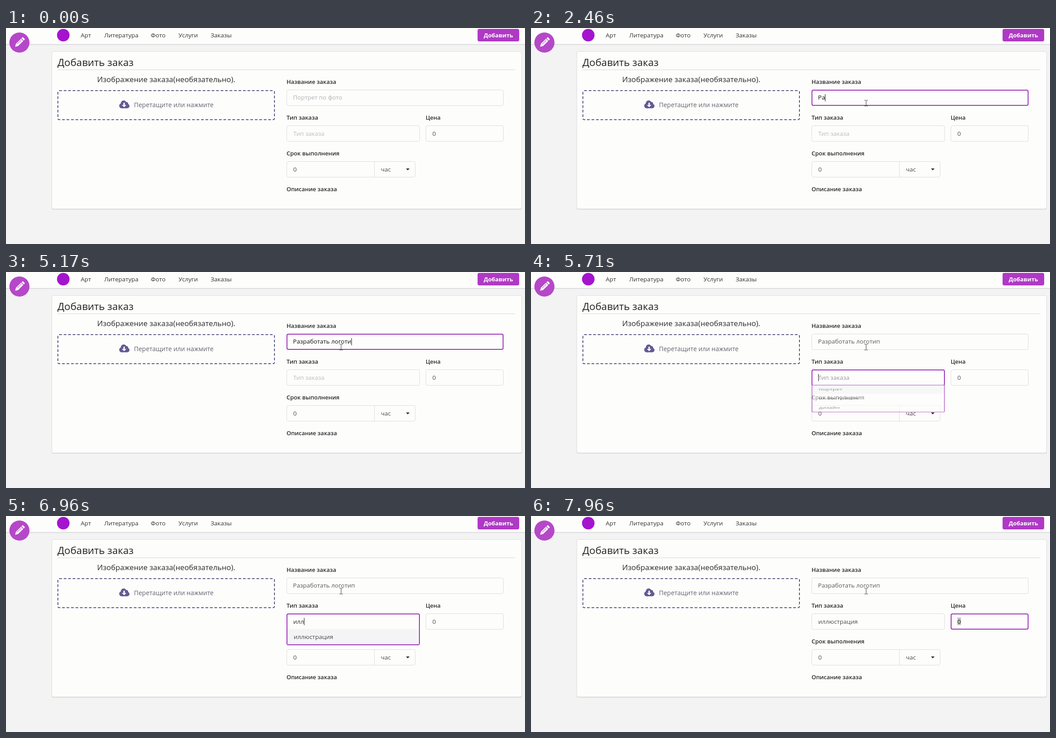
These frames come from a looping animation (1160x483 px, 8000 ms). An HTML page:

```html
<!DOCTYPE html>
<html lang="ru">
<head>
<meta charset="utf-8">
<title>Добавить заказ</title>
<style>
  html, body { margin: 0; width: 100%; height: 100%; overflow: hidden; background: #f3f3f4; }
  svg { display: block; width: 1160px; height: 483px; }
  text { font-family: "Open Sans", "Noto Sans", sans-serif; font-size: 13.5px; fill: #4a4a4c; white-space: pre; }
  .nav { fill: #333; }
  .label { font-size: 13px; font-weight: 600; fill: #2a2a2c; }
  .field { fill: #fdfdfc; stroke: #dcdce0; }
  .focus { fill: none; stroke: #9c33b6; stroke-width: 2; }
  .caret { fill: #111; }
  .drop {
    position: absolute; left: 115px; top: 139px; width: 486px; height: 67px;
    box-sizing: border-box; border: 2px dashed #5f5985; border-radius: 4px;
  }
</style>
</head>
<body>
<svg viewBox="0 0 1160 483">
  <!-- header -->
  <rect width="1160" height="36" fill="#fdfdfc"/>
  <rect y="36" width="1160" height="1" fill="#d3d3d6"/>
  <rect y="37" width="1160" height="1" fill="#e4e4e7"/>
  <circle cx="128" cy="16" r="14" fill="#a414cf"/>
  <text class="nav" x="167" y="21">Арт</text>
  <text class="nav" x="219.500" y="21">Литература</text>
  <text class="nav" x="323.500" y="21">Фото</text>
  <text class="nav" x="385.500" y="21">Услуги</text>
  <text class="nav" x="457.500" y="21">Заказы</text>
  <rect x="1054" y="2" width="93" height="28" rx="4" fill="#af39c5"/>
  <text x="1100.500" y="21" text-anchor="middle" style="font-weight:700;font-size:12.800px;fill:#fff">Добавить</text>

  <!-- round edit button -->
  <circle cx="30" cy="32.500" r="22.500" fill="#b548c8"/>
  <g transform="translate(30 32.500) rotate(45)" fill="#fff">
    <path d="M-3.500-8.500h7v16l-3.500 6-3.500-6z"/>
    <path d="M-3.500-10v-2.500q0-1.500 1.500-1.500h4q1.500 0 1.500 1.500v2.500z"/>
    <path d="M-1-7v13" stroke="#b548c8"/>
  </g>

  <!-- card -->
  <rect x="102" y="53" width="1051" height="353" rx="4" fill="#d9d9dd"/>
  <rect x="102.500" y="52.500" width="1050" height="352" rx="4" fill="#fdfdfc" stroke="#dcdce0"/>
  <text x="115" y="85" style="font-size:22.500px;fill:#222">Добавить заказ</text>
  <path d="M115 93.500H1138" stroke="#d6d5de"/>
  <text x="358" y="121" text-anchor="middle" style="font-size:16.800px;fill:#2c2c2e">Изображение заказа(необязательно).</text>

  <!-- drop zone -->
  <g fill="#635a92">
    <circle cx="258.500" cy="174" r="5.500"/>
    <circle cx="263" cy="168.500" r="6.500"/>
    <circle cx="269" cy="169.500" r="4"/>
    <circle cx="271" cy="174.500" r="5"/>
    <rect x="258.500" y="168" width="12.500" height="11.500"/>
    <path d="M262.500 167h3v5h3.500l-5 5-5-5h3.500z" fill="#fdfdfc"/>
  </g>
  <text x="286" y="177" style="fill:#66636f;font-size:14px">Перетащите или нажмите</text>

  <!-- form -->
  <text class="label" x="627" y="125">Название заказа</text>
  <text class="label" x="627" y="205">Тип заказа</text>
  <text class="label" x="938" y="205">Цена</text>
  <text class="label" x="627" y="285">Срок выполнения</text>
  <text class="label" x="627" y="365">Описание заказа</text>

  <rect id="nameBox" class="field" x="627.500" y="138.500" width="484" height="35" rx="3.500"/>
  <text id="name" x="641.500" y="160"></text>

  <rect id="priceBox" class="field" x="938.500" y="218.500" width="173" height="35" rx="3.500"/>
  <rect id="mark" x="953" y="227" width="8" height="17" fill="#c4c4c8"/>
  <text id="price" x="953" y="241">0</text>

  <rect class="field" x="627.500" y="298.500" width="287" height="35" rx="3.500"/>
  <path d="M823.500 299v34" stroke="#dcdce0"/>
  <text x="642" y="321">0</text>
  <text x="838" y="321">час</text>
  <path d="M894 314h8l-4 4.500z" fill="#333"/>

  <rect id="typeBox" class="field" x="627.500" y="218.500" width="297" height="35" rx="3.500"/>
  <rect id="focus" class="focus" rx="3"/>
  <g id="menu">
    <path id="menuBox" class="focus" style="fill:#fdfdfc"/>
    <rect x="629" y="253" width="294" height="34" fill="#f4f4f6"/>
    <g id="items"></g>
  </g>
  <text id="type" x="642" y="241"></text>

  <rect id="caret" class="caret" width="1" height="16"/>

  <!-- pointers -->
  <path id="arrow" d="M0 0v16l3.700-3.500 2.600 6 2.400-1-2.600-5.900h5.200z" fill="#fff" stroke="#222"/>
  <path id="beam" d="M745.500 161.500h2.500l1 1 1-1h2.500M749 162.500v11M745.500 174.500h2.500l1-1 1 1h2.500" fill="none" stroke="#333"/>
</svg>
<div class="drop"></div>
<script>
const LOOP = 8000, BLINK = 530;
const CLICK = 760, TAB = 5600, PICK = 7230, TAB2 = 7600;
const TITLE = "Разработать логотип", TITLE_START = 2290, TITLE_STEP = 166;
const QUERY_KEYS = [6480, 6680, 6860];
const OPTIONS = ["портрет", "иллюстрация", "дизайн"];
const $ = id => document.getElementById(id);
const clamp = v => Math.max(0, Math.min(1, v));
const ease = v => v * v * (3 - 2 * v);
const show = (id, on) => $(id).setAttribute("visibility", on ? "visible" : "hidden");

function setText(id, text, fill) {
  const el = $(id);
  if (el.textContent !== text) el.textContent = text;
  el.style.fill = fill;
}

// Two-pixel ring that shares the outer edge of the field's thin border.
function setFocus(id) {
  show("focus", id);
  if (!id) return;
  const insets = { x: 0.5, y: 0.5, width: -1, height: -1 };
  for (const [key, inset] of Object.entries(insets))
    $("focus").setAttribute(key, +$(id).getAttribute(key) + inset);
}

function setItems(list) {
  const key = list.join();
  if ($("items").dataset.key === key) return;
  $("items").dataset.key = key;
  $("items").innerHTML = list.map((s, i) =>
    `<text x="643" y="${275 + i * 34.5}">${s}</text>`).join("");
  const bottom = Math.round(253 + list.length * 34.5);
  $("menuBox").setAttribute("d",
    `M628 251V${bottom - 3}q0 3 3 3H921q3 0 3-3V251`);
}

function drawPointer(t) {
  const p = ease(clamp((t - 480) / 260));
  const x = 1100 - 351 * p, y = 18 + 150 * p;
  show("arrow", t >= 500 && y < 138);
  show("beam", t >= 500 && y >= 138);
  $("arrow").setAttribute("transform", `translate(${x} ${y})`);
  $("beam").setAttribute("transform", `translate(${x - 749} ${y - 168})`);
}

function drawCaret(t, field, since, y) {
  const el = $(field);
  const empty = t < (field === "name" ? TITLE_START : QUERY_KEYS[0]);
  const width = empty ? 0 : el.getComputedTextLength();
  show("caret", Math.floor((t - since) / BLINK) % 2 === 0);
  $("caret").setAttribute("x", Math.round(+el.getAttribute("x") + width));
  $("caret").setAttribute("y", y);
}

function render(t) {
  const inName = t >= CLICK && t < TAB;
  const inType = t >= TAB && t < TAB2;
  const inPrice = t >= TAB2;

  const typed = Math.max(0, Math.min(TITLE.length, Math.floor((t - TITLE_START) / TITLE_STEP) + 1));
  if (typed) setText("name", TITLE.slice(0, typed), inName ? "#111" : "#58585c");
  else setText("name", "Портрет по фото", inName ? "#828286" : "#b0b0b4");
  $("name").style.fontWeight = typed && !inName ? 400 : 500;

  const keys = QUERY_KEYS.filter(k => k <= t);
  const query = OPTIONS[1].slice(0, keys.length);
  if (t >= PICK) setText("type", OPTIONS[1], "#4a4a4c");
  else if (query) setText("type", query, "#2c2c2e");
  else setText("type", "Тип заказа", inType ? "#98989c" : "#bcbcc0");

  setFocus(inName ? "nameBox" : inType ? "typeBox" : inPrice ? "priceBox" : "");
  show("mark", inPrice);
  $("price").style.fill = inPrice ? "#1c1c1c" : "#4a4a4c";

  setItems(OPTIONS.filter(s => s.startsWith(query)));
  const open = ease(clamp((t - TAB) / 200)) * (1 - ease(clamp((t - PICK) / 200)));
  $("menu").setAttribute("transform", `translate(0 ${252 * (1 - open)}) scale(1 ${open})`);
  $("menu").setAttribute("opacity", open);
  show("menu", open > 0);

  if (inName) {
    drawCaret(t, "name", typed ? TITLE_START + (typed - 1) * TITLE_STEP : CLICK, 148);
  } else if (inType) {
    drawCaret(t, "type", t >= PICK ? PICK : keys[keys.length - 1] || TAB, 228);
  } else show("caret", false);

  drawPointer(t);
}

function tick() {
  render(performance.now() % LOOP);
  requestAnimationFrame(tick);
}
tick();
</script>
</body>
</html>
```
